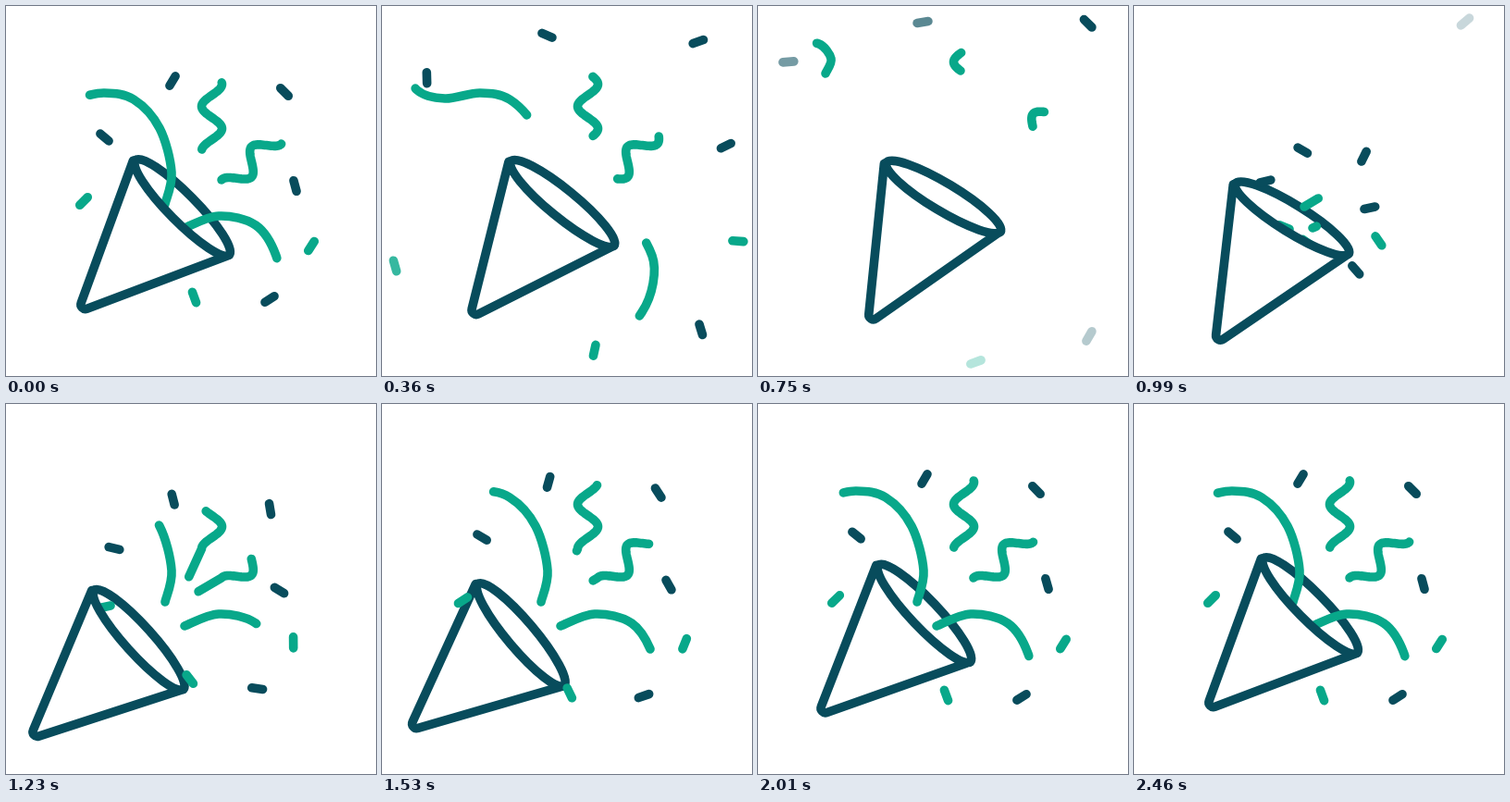
An HTML page with a canvas that plays this animation: 400 by 400 pixels, repeating every 2490 ms.

```html
<!DOCTYPE html>
<html lang="en">
<head>
<meta charset="utf-8">
<title>Party popper</title>
<style>
  html, body { margin: 0; height: 100%; overflow: hidden; background: #fff; }
  canvas { display: block; width: 100vw; height: 100vh; }
</style>
</head>
<body>
<canvas id="stage" width="400" height="400"></canvas>
<script>
const ctx = document.getElementById('stage').getContext('2d');
const LOOP = 2490, STEP = 30, RELOAD = 900;
const DARK = '#084c5c', GREEN = '#08a88a';
const RAD = Math.PI / 180;
const MUZZLE = { x: 185, y: 247 };

const clamp = (v, lo = 0, hi = 1) => Math.min(hi, Math.max(lo, v));
const mix = (a, b, u) => a + (b - a) * u;
const progress = (t, from, to) => clamp((t - from) / (to - from));
const smooth = (t, from, to) => {
  const u = progress(t, from, to);
  return u * u * (3 - 2 * u);
};
// Ease-out from `start` to the end of the loop.
const settle = (t, start, power) => 1 - (1 - progress(t, start, LOOP)) ** power;

/* ---- cone: tilts back, recoils with a swing, then returns ---- */
function conePose(t) {
  const back = (1 - progress(t, 1250, LOOP) ** 1.8) ** 2.85;
  const kick = smooth(t, 840, 1090) * back;
  const tilt = -14.5 * smooth(t, 0, 810);
  return { x: -45 * kick, y: 35 * kick, turn: mix(tilt, 5.5 * back, smooth(t, 940, 1320)) };
}

function inConeSpace(t, draw) {
  const { x, y, turn } = conePose(t);
  ctx.save();
  ctx.translate(x + 150, y + 173);
  ctx.rotate(turn * RAD);
  ctx.translate(-150, -173);
  ctx.strokeStyle = DARK;
  ctx.beginPath();
  draw();
  ctx.stroke();
  ctx.restore();
}

const rim = (from, to) => ctx.ellipse(190.7, 218, 72, 15, 45.3 * RAD, from, to);

const drawBackRim = t => inConeSpace(t, () => rim(Math.PI, 2 * Math.PI));

const drawBody = t => inConeSpace(t, () => {
  rim(0, Math.PI);
  ctx.lineTo(137.5, 167);
  ctx.arcTo(77.5, 331, 243, 270, 5);
  ctx.closePath();
  ctx.fillStyle = '#fff';
  ctx.fill();
});

/* ---- streamers ---- */
function spline(points) {
  const path = new Path2D();
  const at = i => points[clamp(i, 0, points.length - 1)];
  path.moveTo(...points[0]);
  for (let i = 0; i < points.length - 1; i++) {
    const [a, b, c, d] = [at(i - 1), at(i), at(i + 1), at(i + 2)];
    path.bezierCurveTo(b[0] + (c[0] - a[0]) / 6, b[1] + (c[1] - a[1]) / 6,
      c[0] - (d[0] - b[0]) / 6, c[1] - (d[1] - b[1]) / 6, ...c);
  }
  return path;
}

// A straight lead from the cone's mouth, then a cosine wave along an axis.
function squiggle(x, y, angle) {
  const path = new Path2D();
  const ax = Math.cos(angle * RAD), ay = Math.sin(angle * RAD);
  path.moveTo(184, 217);
  for (let s = 0; s <= 106; s++) {
    const side = -11 * Math.cos(Math.PI * s / 24);
    path.lineTo(x + ax * s - ay * side, y + ay * s + ax * side);
  }
  return path;
}

// Lengths along the path: the resting tail and head, and the far end.
const streamers = [
  {
    path: spline([[172, 214], [179, 180], [166, 132], [138, 101], [106, 94], [68, 100],
      [38, 91], [29, 66], [44, 43], [66, 41], [79, 57], [73, 73]]),
    tail: 0, head: 176, end: 350, life: 820, rush: 1.5, start: 1000, power: 4
  },
  {
    path: spline([[193, 240], [230, 227], [270, 237], [292, 270], [293, 300], [281, 331],
      [252, 362], [212, 372]]),
    tail: 0, head: 124, end: 273, life: 650, rush: 1.6, start: 980, power: 6
  },
  {
    path: squiggle(222.5, 156.5, -90),
    tail: 68, head: 169, end: 216, life: 820, rush: 2.3, start: 1000, power: 8
  },
  {
    path: squiggle(241.4, 195.2, -48),
    tail: 57, head: 158, end: 205, life: 820, rush: 2.3, start: 960, power: 6
  }
];

function drawStreamer({ path, tail, head, end, life, rush, start, power }, t) {
  const leaving = t < RELOAD;
  const from = leaving
    ? mix(tail, end, progress(t, 0, life) ** rush)
    : tail * settle(t, start + 120, power);
  const to = leaving
    ? mix(head, end, progress(t, 0, life * 0.92) ** rush)
    : head * settle(t, start, power);
  if (to - from < 0.5) return;
  ctx.strokeStyle = GREEN;
  ctx.setLineDash([to - from, 9999]);
  ctx.lineDashOffset = -from;
  ctx.stroke(path);
  ctx.setLineDash([]);
}

/* ---- confetti: resting place, drift away, spin while drifting ---- */
const piece = (color, x, y, angle, dx, dy, spin, life) => ({ color, x, y, angle, dx, dy, spin, life });
const confetti = [
  piece(DARK, 180, 81, -59, -2, -64, 230, 930),
  piece(DARK, 301, 93, 45, 57, -76, -180, 1050),
  piece(DARK, 106.5, 142, 40, -74, -82, 135, 900),
  piece(DARK, 312.5, 194.5, 75, 67, -49, 220, 700),
  piece(DARK, 285, 317, -33, 73, 40, -207, 830),
  piece(GREEN, 84, 211, -45, -74, 74, -170, 580),
  piece(GREEN, 203.5, 315, 70, 32, 70, 90, 830),
  piece(GREEN, 330, 259.5, -57, 62, -6, 170, 700)
];

function drawPiece(color, x, y, angle, alpha) {
  const dx = 6 * Math.cos(angle * RAD), dy = 6 * Math.sin(angle * RAD);
  ctx.globalAlpha = alpha;
  ctx.strokeStyle = color;
  ctx.beginPath();
  ctx.moveTo(x - dx, y - dy);
  ctx.lineTo(x + dx, y + dy);
  ctx.stroke();
  ctx.globalAlpha = 1;
}

function drawConfetti({ color, x, y, angle, dx, dy, spin, life }, t) {
  if (t < life) {
    const gone = 1 - (1 - t / life) ** 3;
    drawPiece(color, x + dx * gone, y + dy * gone,
      angle + spin * (t / 750) ** 1.4, clamp((life - t) / 270));
  }
  // Pieces that land nearer to the cone leave it later.
  const reach = Math.hypot(x - MUZZLE.x, y - MUZZLE.y);
  const start = clamp(1900 - 9 * reach, 810, 960);
  if (t >= start) {
    const out = settle(t, start, 7);
    drawPiece(color, mix(MUZZLE.x, x, out), mix(MUZZLE.y, y, out),
      angle - spin / 2 * (1 - settle(t, RELOAD, 4)), 1);
  }
}

function render(t) {
  ctx.fillStyle = '#fff';
  ctx.fillRect(0, 0, 400, 400);
  ctx.lineWidth = 9.6;
  ctx.lineCap = ctx.lineJoin = 'round';
  const scatter = () => confetti.forEach(c => drawConfetti(c, t));
  const landed = t > 1250;
  drawBackRim(t);
  if (!landed) scatter();
  streamers.forEach(s => drawStreamer(s, t));
  drawBody(t);
  if (landed) scatter();
}

let begin;
function tick(now) {
  begin ??= now;
  render(Math.floor(((now - begin) % LOOP) / STEP) * STEP);
  requestAnimationFrame(tick);
}
render(0);
requestAnimationFrame(tick);
</script>
</body>
</html>
```
